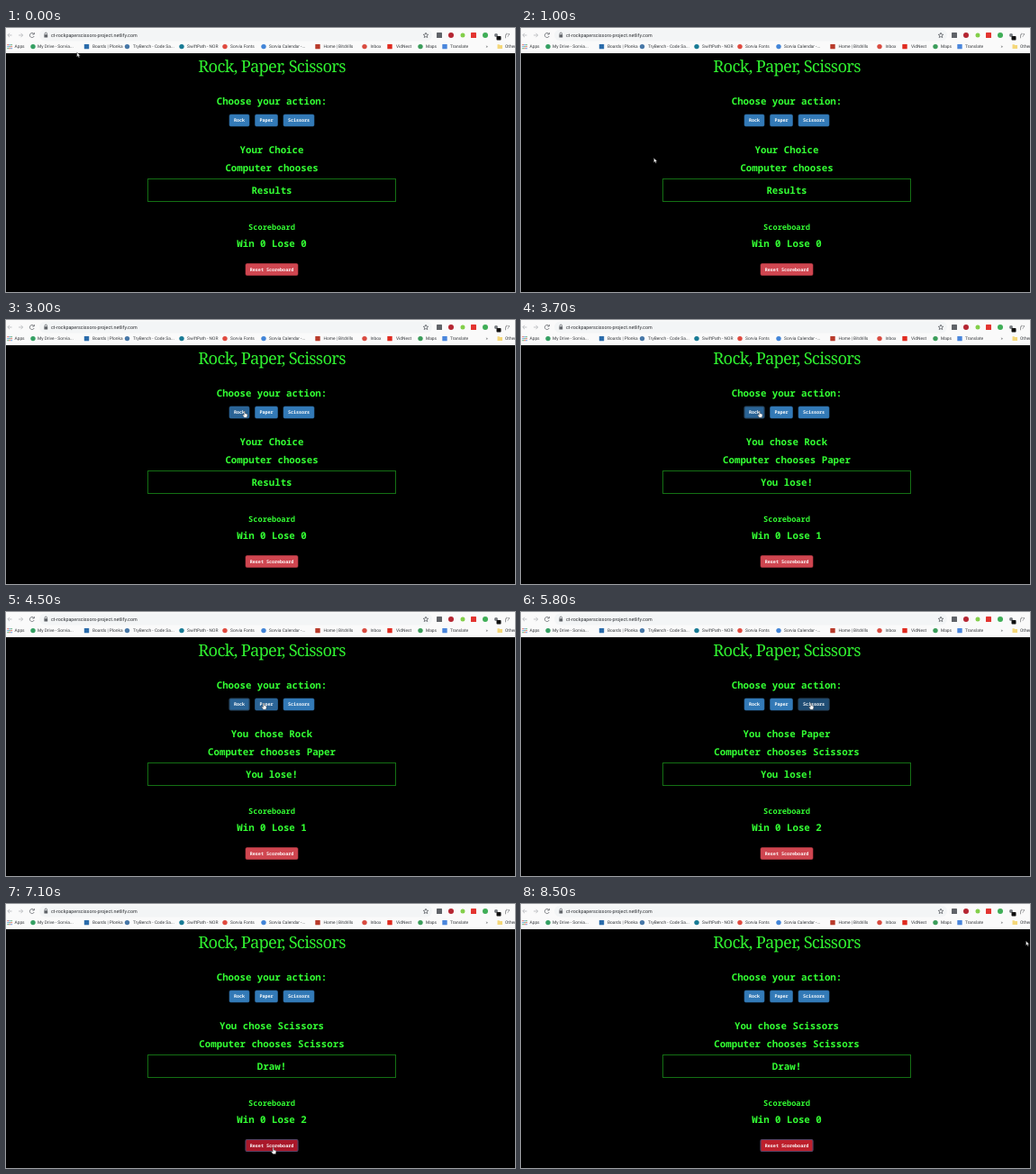
An HTML page for the animation above (8.6 s loop, 565 by 293 pixels).

```html
<!DOCTYPE html>
<html lang="en">
<head>
<meta charset="utf-8">
<title>Rock, Paper, Scissors</title>
<style>
  html, body { margin: 0; width: 100%; height: 100%; overflow: hidden; background: #000; }
  svg { display: block; width: 100%; height: 100%; }
  text { text-rendering: geometricPrecision; }
  .page text { font: 600 10.75px "Noto Sans Mono", monospace; fill: #33ff33; text-anchor: middle; }
  .page .title { font: 18.3px "Noto Serif", serif; letter-spacing: -.7px; fill: #30f030; }
  .page .small { font-size: 8.65px; }
  .page .button text { font-size: 5.05px; fill: #fff; }
  .button rect { stroke-width: .6; }
  .bar text { font: 4.85px Roboto, sans-serif; fill: #36393d; }
  .bar .url { font-size: 5.36px; fill: #2c2f33; }
  .line { fill: none; stroke: #5f6368; stroke-width: .8; }
  .faint { stroke: #b4b7ba; }
</style>
</head>
<body>
<svg viewBox="0 0 565 293">
  <rect width="565" height="293"/>
  <g class="bar">
    <rect width="565" height="28" fill="#fafafa"/>
    <rect x="37" y="1.5" width="436" height="13" rx="6.5" fill="#f3f5f6"/>
    <path class="line faint" d="M6.5 8H2M4 5.8 1.8 8 4 10.2M14 8h4.5M16.5 5.8 18.7 8l-2.2 2.2"/>
    <path class="line" d="M31 6.7A2.5 2.5 0 1 0 31.2 9M31.3 5v2h-2"/>
    <path class="line" d="M43.1 7.5V6.3a1.2 1.2 0 0 1 2.4 0v1.2"/>
    <rect x="42.4" y="7.2" width="3.8" height="3.4" rx=".4" fill="#5f6368"/>
    <text class="url" x="50" y="9.9">ct-rockpaperscissors-project.netlify.com</text>
    <path class="line" stroke-width=".6" d="m466 5.2.8 1.9 2 .2-1.5 1.3.5 2-1.8-1.1-1.8 1.1.5-2-1.5-1.3 2-.2z"/>
    <g id="bookmarks"></g>
    <g id="extensions"></g>
    <rect x="544.5" y="9" width="5" height="4.6" rx=".8" fill="#111"/>
    <text x="554" y="10" style="font:italic 6px 'Liberation Serif',serif">f?</text>
    <text x="532.5" y="22.2">»</text>
    <path d="M545.5 18.3h2l.7.8h2.8v4h-5.5z" fill="#f4d779"/>
    <text x="554" y="22.2">Other</text>
  </g>
  <g class="page">
    <text class="title" x="295" y="49.3">Rock, Paper, Scissors</text>
    <text x="295" y="85">Choose your action:</text>
    <text id="choice" x="295" y="138.8"></text>
    <text id="computer" x="295" y="159"></text>
    <rect x="157.5" y="167.5" width="275" height="25" fill="none" stroke="#147014"/>
    <text id="result" x="295" y="184"></text>
    <text class="small" x="295" y="224.2">Scoreboard</text>
    <text id="score" x="295" y="242.8"></text>
    <g id="buttons"></g>
  </g>
  <g id="cursor" stroke-linejoin="round">
    <path id="arrow" d="M0 0v5l1.2-1 .8 1.8.9-.4-.8-1.7h1.6z" fill="#fff" stroke="#333" stroke-width=".5"/>
    <path id="hand" d="M-.6.2Q0-.5.6.2V2.6l2 .5q.7.3.6 1.1L2.7 7H-.4L-2.2 4.4q0-.8.8-.5l.8.6z" fill="#fff" stroke="#222" stroke-width=".4"/>
  </g>
</svg>
<script>
const LOOP = 8600, STEP = 100;
const byId = id => document.getElementById(id);

// icon centre, text start, icon colour, label, square icon
const bookmarks = [
  [30, 35, "#35a063", "My Drive - Sorvia..."],
  [89.5, 96, "#2b6cab", "Boards | Plonka", true],
  [134.5, 141, "#4878a8", "TryBench - Code Sa..."],
  [195, 201, "#187b95", "SwiftPath - NOR"],
  [243, 249, "#e04a3f", "Sorvia Fonts"],
  [286, 292, "#4285d8", "Sorvia Calendar -..."],
  [346, 352.5, "#b83a2a", "Home | Bitdrills", true],
  [398, 404.5, "#d94b40", "Inbox"],
  [426, 433, "#e02b20", "VidNest", true],
  [460, 466, "#3b9d5a", "Maps"],
  [487, 493, "#4a86dc", "Translate", true]
];
const icon = (x, y, r, color, square) => square
  ? `<rect x="${x - r}" y="${y - r}" width="${2 * r}" height="${2 * r}" rx=".6" fill="${color}"/>`
  : `<circle cx="${x}" cy="${y}" r="${r}" fill="${color}"/>`;

const appColors = ["#d94b40", "#4285d8", "#3b9d5a"];
let appGrid = "";
for (let i = 0; i < 9; i++) {
  const col = i % 3, row = Math.floor(i / 3);
  appGrid += icon(2.1 + col * 2, 18.6 + row * 2, .7, appColors[(col + row) % 3], true);
}

byId("bookmarks").innerHTML = appGrid + '<text x="9.5" y="22.2">Apps</text>' +
  bookmarks.map(([x, textX, color, label, square]) =>
    icon(x, 20.6, 2.7, color, square) + `<text x="${textX}" y="22.2">${label}</text>`).join("");

byId("extensions").innerHTML = [
  [481, 3, "#606368", true], [494, 3, "#b52632"], [507, 2.5, "#83cf4a"],
  [519, 3, "#e33430", true], [532, 3, "#3fae57"], [544, 2, "#777b80"]
].map(([x, r, color, square]) => icon(x, 8, r, color, square)).join("");

const blue = { normal: "#337ab7", hover: "#2b6496", focus: "#2b6496", active: "#204d74", border: "#2e6da4", ring: "#27455f" };
const red = { normal: "#cf4650", hover: "#b9303a", focus: "#bd202c", active: "#a9182a", border: "#c23c47", ring: "#554264" };
const buttons = [
  { label: "Rock", x: 248, y: 96, w: 22, colors: blue, press: 3500 },
  { label: "Paper", x: 276.5, y: 96, w: 25, colors: blue, press: 4800 },
  { label: "Scissors", x: 308, y: 96, w: 34, colors: blue, press: 5800 },
  { label: "Reset Scoreboard", x: 266, y: 261.5, w: 58, colors: red, press: 7100 }
];
byId("buttons").innerHTML = buttons.map(({ label, x, y, w }) =>
  `<g class="button"><rect x="${x}" y="${y}" width="${w}" height="13" rx="1.5"/>
   <text x="${x + w / 2}" y="${y + 8.3}">${label}</text></g>`).join("");
buttons.forEach((b, i) => b.rect = byId("buttons").children[i].firstChild);

// time, x, y of the pointer tip
const route = [
  [0, 78.7, 27], [300, 78.7, 27], [1600, 202, 237.3], [2100, 202, 237.3],
  [2800, 264.8, 101.2], [3800, 264.8, 101.2], [4300, 286, 101.2], [5000, 286, 101.2],
  [5500, 321.7, 101.2], [6100, 321.7, 101.2], [6900, 296.7, 270.5], [7400, 296.7, 270.5],
  [8400, 560.5, 41], [LOOP, 560.5, 41]
];
function pointerAt(t) {
  const i = route.findIndex(p => p[0] > t);
  const [t0, x0, y0] = route[i - 1], [t1, x1, y1] = route[i];
  const u = (t - t0) / (t1 - t0), ease = u * u * (3 - 2 * u);
  return [x0 + (x1 - x0) * ease, y0 + (y1 - y0) * ease];
}

// time, player's choice, computer's choice, result, losses
const rounds = [
  [0, "Your Choice", "Computer chooses", "Results", 0],
  [3600, "You chose Rock", "Computer chooses Paper", "You lose!", 1],
  [4900, "You chose Paper", "Computer chooses Scissors", "You lose!", 2],
  [5900, "You chose Scissors", "Computer chooses Scissors", "Draw!", 2],
  [7200, "You chose Scissors", "Computer chooses Scissors", "Draw!", 0]
];

function draw(t) {
  const [, choice, computer, result, losses] = rounds.findLast(r => r[0] <= t);
  byId("choice").textContent = choice;
  byId("computer").textContent = computer;
  byId("result").textContent = result;
  byId("score").textContent = `Win 0 Lose ${losses}`;

  const [px, py] = pointerAt(t);
  const focused = buttons.findLast(b => b.press <= t);
  let overButton = false;
  for (const b of buttons) {
    const hover = px >= b.x && px <= b.x + b.w && py >= b.y && py <= b.y + 13;
    const active = t >= b.press && t < b.press + STEP;
    const state = active ? "active" : b === focused ? "focus" : hover ? "hover" : "normal";
    overButton ||= hover;
    b.rect.setAttribute("fill", b.colors[state]);
    b.rect.setAttribute("stroke", b === focused ? b.colors.ring : b.colors.border);
    b.rect.style.strokeWidth = b === focused ? 1.2 : .6;
  }
  byId("cursor").setAttribute("transform", `translate(${px} ${py})`);
  byId("arrow").style.display = overButton ? "none" : "";
  byId("hand").style.display = overButton ? "" : "none";
}

const start = performance.now();
function tick() {
  const t = (performance.now() - start) % LOOP;
  draw(Math.floor(t / STEP) * STEP);
  requestAnimationFrame(tick);
}
tick();
</script>
</body>
</html>
```
